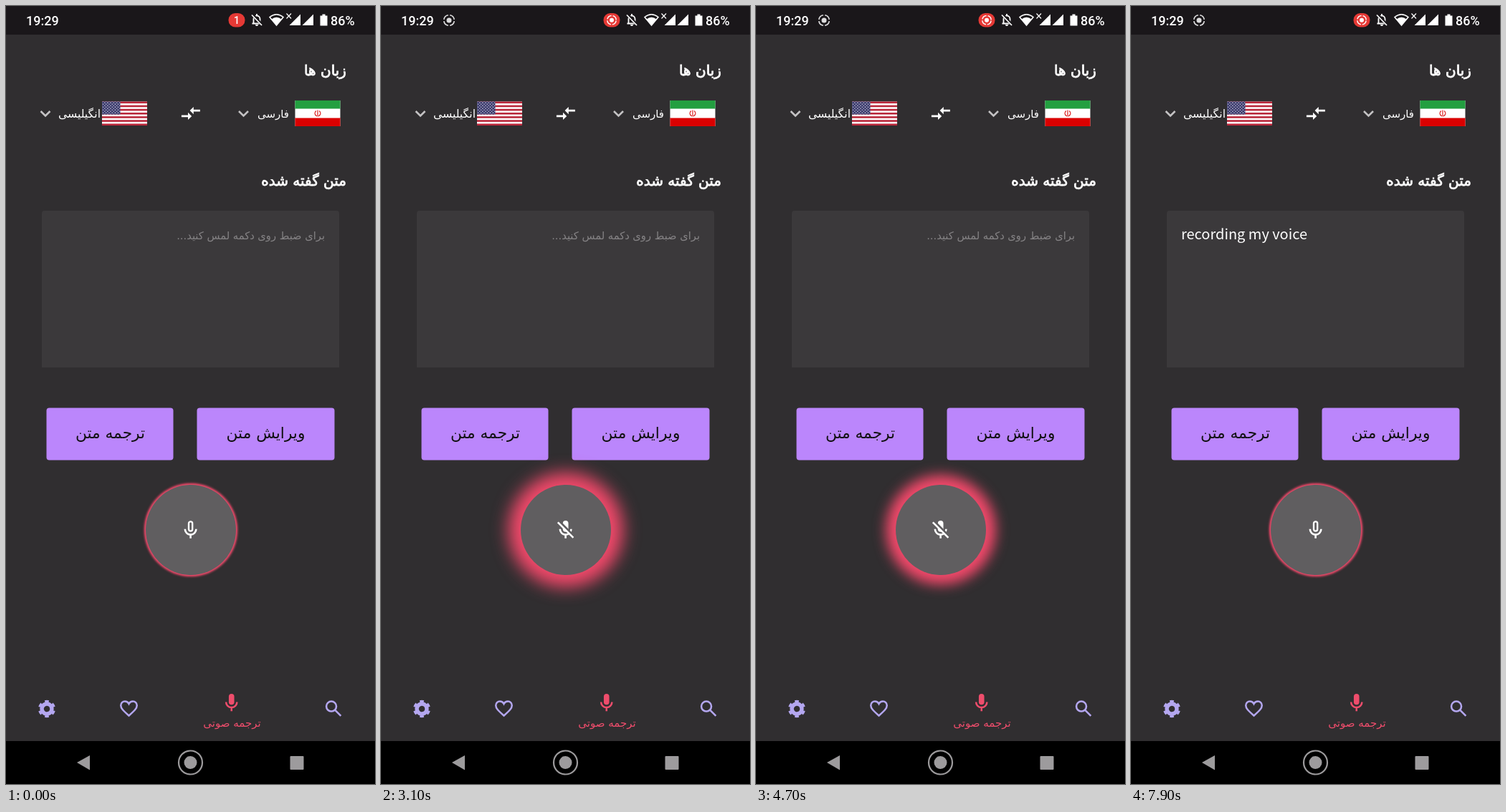
Recreate the animation shown at these times as an HTML page. Size 515 by 1087 pixels, loop 8000 ms.

```html
<!DOCTYPE html>
<html lang="fa">
<head>
<meta charset="utf-8">
<title>Voice translation</title>
<style>
  html, body { margin: 0; width: 100%; height: 100%; overflow: hidden; background: #302e30; }
  svg { display: block; }
  #stage { position: absolute; left: 0; top: 0; }
  /* the glow starts just under the edge of the disc, so no seam shows */
  #record { position: absolute; left: 196px; top: 670px; width: 124px; height: 124px; border-radius: 50%; }
  #record svg { position: absolute; left: -1px; top: -1px; }
  .fa { font-family: "DejaVu Sans", sans-serif; direction: rtl; }
  .title { font-size: 20px; fill: #fff; stroke: #fff; stroke-width: .8; }
  .small { font-size: 15px; fill: #fff; }
  .button { font-size: 21.7px; text-anchor: middle; fill: #111; }
  .status { font: 500 18px Roboto, sans-serif; fill: #fff; }
  #hint { font-size: 14.7px; fill: #858385; }
  #speech { font: 20px "Noto Sans CJK JP", "Noto Sans CJK SC", "Noto Sans", sans-serif; fill: #fff; }
  .line { fill: none; stroke: currentColor; stroke-width: 2; }
  .solid { fill: currentColor; }
</style>
</head>
<body>
<svg id="stage" width="515" height="1087" viewBox="0 0 515 1087">
  <defs>
    <g id="mic">
      <rect class="solid" x="9" y="2" width="6" height="12" rx="3"/>
      <path class="line" d="M6 11a6 6 0 0 0 12 0M12 17v4"/>
    </g>
    <g id="target">
      <circle class="solid" r="3.5"/>
      <circle class="line" r="7.3" pathLength="8" stroke-dasharray="1.6 .4" stroke-dashoffset="-.2" style="stroke-width:1.7"/>
    </g>
    <path id="chevron" d="M-6.5-3.5L0 3L6.5-3.5" fill="none" stroke="#c4c3c4" stroke-width="2.6"/>
    <pattern id="stars" width="4.2" height="4" patternUnits="userSpaceOnUse">
      <circle cx="1.2" cy="1.2" r=".65" fill="#fff"/>
      <circle cx="3.3" cy="3.2" r=".65" fill="#fff"/>
    </pattern>
  </defs>

  <rect width="515" height="1087" fill="#302e30"/>

  <!-- status bar -->
  <rect width="515" height="40" fill="#1a171a"/>
  <g color="#fff" fill="#fff">
    <text class="status" x="28" y="27">19:29</text>
    <use id="capture" href="#target" x="95" y="20" color="#deddde"/>
    <rect x="310.500" y="10" width="23" height="19.500" rx="9.500" fill="#e53935"/>
    <text id="count" class="status" x="322" y="25" text-anchor="middle" style="font-size:14px">1</text>
    <use id="live" href="#target" transform="translate(322 19.700) scale(.85)"/>
    <path class="line" d="M343.5 24.5h13M345.5 24v-6a4.5 4.5 0 0 1 9 0v6M350 11v2.5" style="stroke-width:1.8"/>
    <path d="M348 26h4a2 2 0 0 1-4 0z"/>
    <path d="M344 12L358 27" stroke="#1a171a" stroke-width="4"/>
    <path d="M343 12.5L357 27" stroke="#fff" stroke-width="1.7"/>
    <path d="M377.5 27L368 15.5Q377.5 8 387 15.5Z" fill="none" stroke="#fff" stroke-width="1.5"/>
    <path d="M377.5 27L370.5 18.5Q377.5 13 384.5 18.5Z"/>
    <path d="M391.5 10.5l6.5 7m0-7l-6.5 7" stroke="#fff" stroke-width="1.2"/>
    <path d="M395.5 27L411 11.5V27ZM413.5 27L429 11.5V27Z"/>
    <path d="M441.500 11.500h4v2h3v14h-10v-14h3z"/>
    <text class="status" x="453" y="27">86%</text>
  </g>

  <!-- languages -->
  <text class="fa title" x="475" y="97">زبان ها</text>
  <text class="fa small" x="395" y="156">فارسی</text>
  <text class="fa small" x="132" y="156" style="font-size:15.700px">انگیلیسی</text>
  <use href="#chevron" x="331.5" y="150.5"/>
  <use href="#chevron" x="55" y="150.5"/>
  <path transform="translate(242.3 134.4) scale(1.3)" fill="#fff"
    d="M9 14H2v2h7v3l4-4-4-4zM15 13v-3h7V8h-7V5l-4 4z"/>
  <g>
    <rect x="403.5" y="132" width="63" height="36" fill="#fff"/>
    <path d="M403.5 132h63v11h-63z" fill="#239f40"/>
    <path d="M403.5 157h63v11h-63z" fill="#da0000"/>
    <path d="M403.5 143.500h63" stroke="#239f40" stroke-dasharray="1 1"/>
    <path d="M403.5 156.500h63" stroke="#da0000" stroke-dasharray="1 1"/>
    <path d="M435 145.5v9M432.8 146.5q-4 4 1 7.5M437.2 146.5q4 4-1 7.5" fill="none" stroke="#da2020" stroke-width="1.2"/>
  </g>
  <g>
    <rect x="134" y="133.5" width="63" height="33.5" fill="#fff"/>
    <g id="stripes" fill="#b8273a"></g>
    <path d="M134 133.5h25.5v18h-25.5z" fill="#3c3b6e"/>
    <path d="M134 133.5h25.5v18h-25.5z" fill="url(#stars)"/>
  </g>

  <!-- spoken text -->
  <text class="fa title" x="475" y="251">متن گفته شده</text>
  <path d="M50 505V290a4 4 0 0 1 4-4h407a4 4 0 0 1 4 4v215z" fill="#3b393b"/>
  <text id="hint" class="fa" x="445" y="326">برای ضبط روی دکمه لمس کنید...</text>
  <text id="speech" x="70" y="325.5"></text>

  <!-- buttons -->
  <g fill="#bb86fc">
    <rect x="56.5" y="561.5" width="177" height="73" rx="4"/>
    <rect x="266.5" y="561.5" width="192" height="73" rx="4"/>
  </g>
  <text class="fa button" x="145.5" y="603.5">ترجمه متن</text>
  <text class="fa button" x="362.5" y="603.5">ویرایش متن</text>

  <!-- app navigation -->
  <g color="#b4a7f0">
    <g transform="translate(57 982) scale(1.25) rotate(-105)">
      <circle class="line" r="5.6" style="stroke-width:4.4"/>
      <circle class="line" r="8.3" pathLength="12" stroke-dasharray="1 1" style="stroke-width:2.8"/>
    </g>
    <path class="line" transform="translate(156.5 966.5) scale(1.25)"
      d="M12 20C6 14.6 3 12 3 8.5A4.5 4.5 0 0 1 7.5 4C9.5 4 11.2 5.2 12 6.8C12.8 5.2 14.5 4 16.5 4A4.5 4.5 0 0 1 21 8.5C21 12 18 14.6 12 20Z"/>
    <g transform="translate(442 966.5) scale(1.27)">
      <circle class="line" cx="9.5" cy="9.5" r="5.5"/>
      <path class="line" d="M13.5 13.5L20 20"/>
    </g>
  </g>
  <use href="#mic" color="#ef4d6c" transform="translate(299.5 958.5) scale(1.27)"/>
  <text class="fa small" x="315.5" y="1007" text-anchor="middle" style="fill:#ef4d6c">ترجمه صوتی</text>

  <!-- system navigation -->
  <rect y="1027" width="515" height="60"/>
  <g fill="#9d9b9d">
    <path d="M99 1057L117 1047V1067.5Z"/>
    <circle cx="257.5" cy="1057" r="9"/>
    <circle cx="257.5" cy="1057" r="16.5" fill="none" stroke="#9d9b9d" stroke-width="2.2"/>
    <rect x="396.5" y="1048" width="19" height="19" rx="1"/>
  </g>
</svg>

<div id="record">
  <svg width="126" height="126" color="#fff">
    <circle cx="63" cy="63" r="63" fill="#605e60"/>
    <g id="micIdle" transform="translate(47 47.5) scale(1.3)">
      <rect class="line" x="10" y="3" width="4" height="10.2" rx="2" style="stroke-width:1.8"/>
      <path class="line" d="M6 11a6 6 0 0 0 12 0M12 17v4"/>
    </g>
    <g id="micOff" transform="translate(47 47.5) scale(1.3)">
      <use href="#mic"/>
      <path d="M5 2.5L21.5 19" stroke="#605e60" stroke-width="2.4"/>
      <path class="line" d="M3.7 3.7L20.3 20.3"/>
    </g>
  </svg>
</div>

<script>
const LOOP = 8000, STEP = 100;
const CAPTURE_START = 500, LISTEN_START = 1000, LISTEN_END = 6500;
const FIRST_WORD = 5600, ALL_WORDS = 6400;

// [time, glow spread] of the microphone level
const levels = [
  [0, 2.2], [1000, 2.2], [1200, 3.5], [1400, 3.5], [1800, 8], [2200, 7], [2400, 8],
  [3100, 17], [3400, 18], [3800, 10], [4200, 7.3], [4600, 15], [5000, 9],
  [5300, 9.3], [5600, 11], [5900, 9], [6200, 10], [6400, 8], [6600, 2.2], [8000, 2.2]
];

const el = id => document.getElementById(id);
const show = (id, visible) => { el(id).style.display = visible ? "" : "none"; };

function levelAt(t) {
  const i = levels.findIndex(([time]) => time > t);
  const [t0, a] = levels[i - 1], [t1, b] = levels[i];
  return a + (b - a) * (t - t0) / (t1 - t0);
}

const stripe = 33.5 / 13;
let stripes = "";
for (let i = 0; i < 13; i += 2)
  stripes += `<rect x="134" y="${133.5 + i * stripe}" width="63" height="${stripe}"/>`;
el("stripes").innerHTML = stripes;

function draw(now) {
  const t = Math.floor(now % LOOP / STEP) * STEP;
  const capturing = t >= CAPTURE_START;
  const listening = t >= LISTEN_START && t < LISTEN_END;
  const spread = levelAt(t);

  show("count", !capturing);
  show("capture", capturing);
  show("live", capturing);
  show("micIdle", !listening);
  show("micOff", listening);
  show("hint", t < FIRST_WORD);
  el("speech").textContent =
    t < FIRST_WORD ? "" : t < ALL_WORDS ? "recording" : "recording my voice";
  el("record").style.boxShadow = `0 0 ${spread * 1.35}px ${spread + 1}px #f4496b`;
  requestAnimationFrame(draw);
}
draw(0);
</script>
</body>
</html>
```
